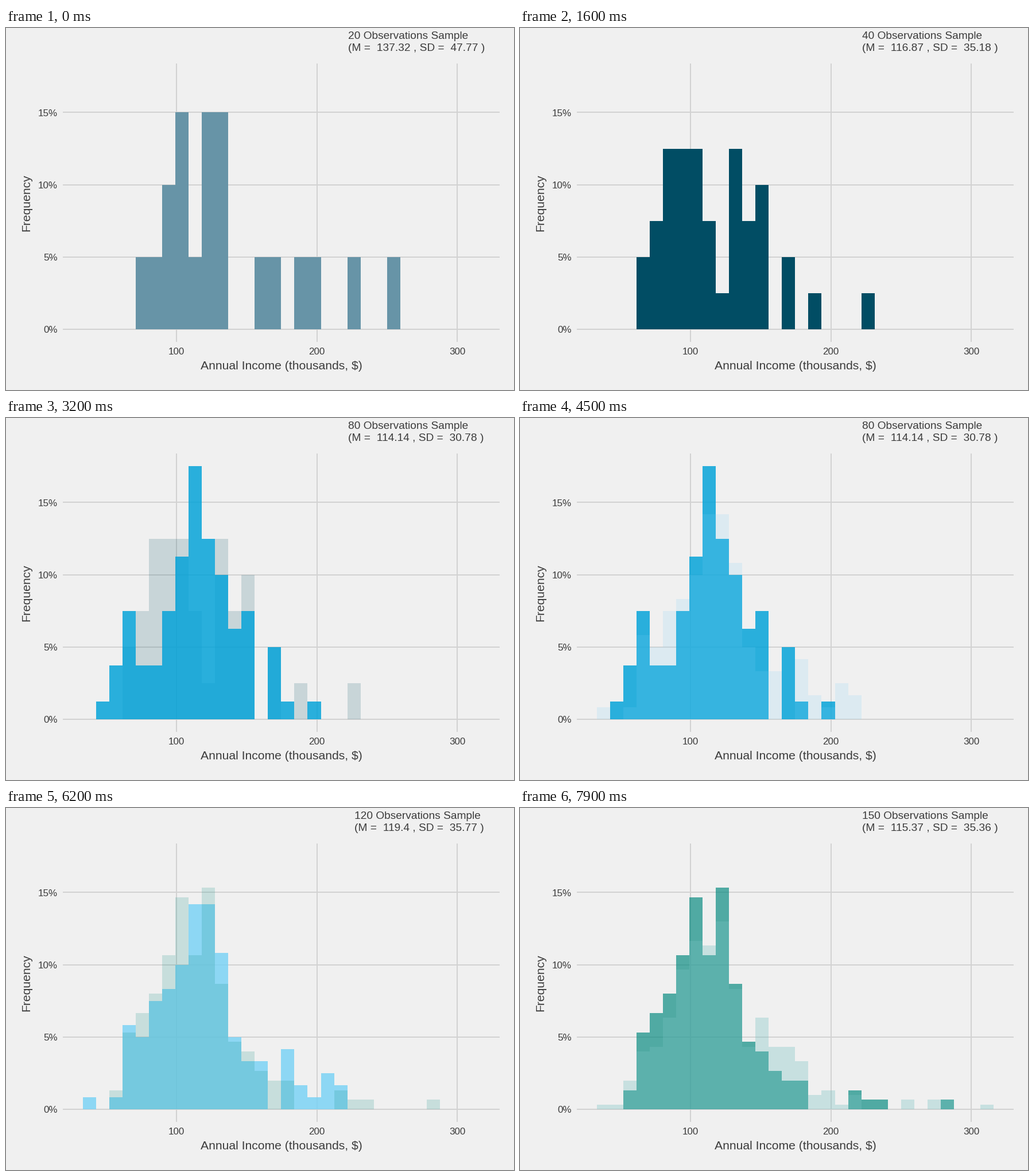
Recreate the animation shown at these times as a matplotlib script. Size 885x632 px, loop 8 s.

```python
import numpy as np
import matplotlib.pyplot as plt
from matplotlib.animation import FuncAnimation

W, H, DPI = 885, 632, 100
FRAMES, STEP_MS = 80, 100
FADE = 6                              # frames per cross-fade
STARTS = [11, 28, 45, 62, 78]         # first frame of each cross-fade

BG, GRID, INK = "#f0f0f0", "#d2d2d2", "#3c3c3c"
BASE, PCT = 526.2, 25.25              # y of 0 %, pixels per percent
BINS = 30
EDGES = 133.6 + 23.05 * np.arange(BINS + 1)

# colour, mean, standard deviation, first filled bin, counts
SAMPLES = [
    ("#6794a7", "137.32", "47.77", 4,
     [1, 1, 2, 3, 1, 3, 3, 0, 0, 1, 1, 0, 1, 1, 0, 0, 1, 0, 0, 1]),
    ("#014d64", "116.87", "35.18", 3,
     [2, 3, 5, 5, 5, 3, 1, 5, 3, 4, 0, 2, 0, 1, 0, 0, 0, 1]),
    ("#01a2d9", "114.14", "30.78", 1,
     [1, 3, 6, 3, 3, 6, 9, 14, 10, 8, 5, 6, 0, 4, 1, 0, 1]),
    ("#7ad2f6", "119.4", "35.77", 0,
     [1, 0, 1, 7, 6, 9, 10, 12, 17, 17, 13, 6, 4, 4, 0, 5, 2, 1, 3, 2]),
    ("#00887d", "115.37", "35.36", 2,
     [2, 8, 10, 12, 16, 22, 16, 23, 13, 7, 6, 4, 3, 3,
      0, 0, 0, 2, 1, 1, 0, 0, 0, 0, 1]),
    ("#76c0c1", "117.52", "39.24", 0,
     [1, 1, 6, 12, 13, 19, 29, 35, 34, 39, 25, 13, 19, 13, 13, 10,
      3, 4, 1, 3, 0, 0, 0, 2, 0, 2, 2, 0, 0, 1]),
]

plt.rcParams["font.family"] = "Liberation Sans"
fig = plt.figure(figsize=(W / DPI, H / DPI), dpi=DPI, facecolor=BG)
ax = fig.add_axes([0, 0, 1, 1])
ax.set_xlim(0, W)
ax.set_ylim(H, 0)
ax.axis("off")


def label(x, y, text, px, **kw):
    kw.setdefault("va", "baseline")
    return ax.text(x, y, text, fontsize=px * 72 / DPI, color=INK, **kw)


def rule(xs, ys):
    ax.plot(xs, ys, color=GRID, lw=1.44, solid_capstyle="butt", zorder=1)


def heights(sample):
    first, counts = sample[3:]
    tops = np.zeros(BINS)
    tops[first:first + len(counts)] = counts
    return BASE - PCT * 100 * tops / tops.sum()


for pct in (0, 5, 10, 15):
    y = BASE - PCT * pct
    rule([98.5, 860], [y, y])
    label(89.5, y + 6.2, f"{pct}%", 17, ha="right")
for income in (100, 200, 300):
    x = 297 + 2.445 * (income - 100)
    rule([x, x], [62, 548])
    label(x, 570.5, str(income), 17, ha="center")
label(479.5, 596, "Annual Income (thousands, $)", 21.2, ha="center")
label(41, 305, "Frequency", 21.2, ha="center", rotation=90,
      rotation_mode="anchor")

TOPS = [heights(s) for s in SAMPLES]
layers = [ax.stairs(TOPS[0], EDGES, baseline=BASE, fill=True, lw=0, zorder=z)
          for z in (2, 3)]
title = label(597, 19, "", 19.1)
stats = label(597, 40, "", 19.1)


def paint(layer, i, alpha):
    layer.set_data(values=TOPS[i])
    layer.set_facecolor(SAMPLES[i][0])
    layer.set_alpha(alpha)


def draw(frame):
    begun = [s for s in STARTS if s <= frame]
    new = len(begun)
    old = max(new - 1, 0)
    step = min(frame - begun[-1] + 1, FADE) if begun else FADE
    mix = step / FADE
    paint(layers[0], old, 1 - mix)
    paint(layers[1], new, mix)

    shown = new if mix > 0.5 else old
    _, mean, sd, _, counts = SAMPLES[shown]
    left = 596 + 10.6 * (6 - len(mean))   # block ends at a fixed right edge
    title.set_text(f"{sum(counts)} Observations Sample")
    stats.set_text(f"(M =  {mean} , SD =  {sd} )")
    for line in (title, stats):
        line.set_x(left)
    return [*layers, title, stats]


anim = FuncAnimation(fig, draw, frames=FRAMES, interval=STEP_MS,
                     init_func=lambda: draw(0), repeat=True, repeat_delay=0)
plt.show()
```
